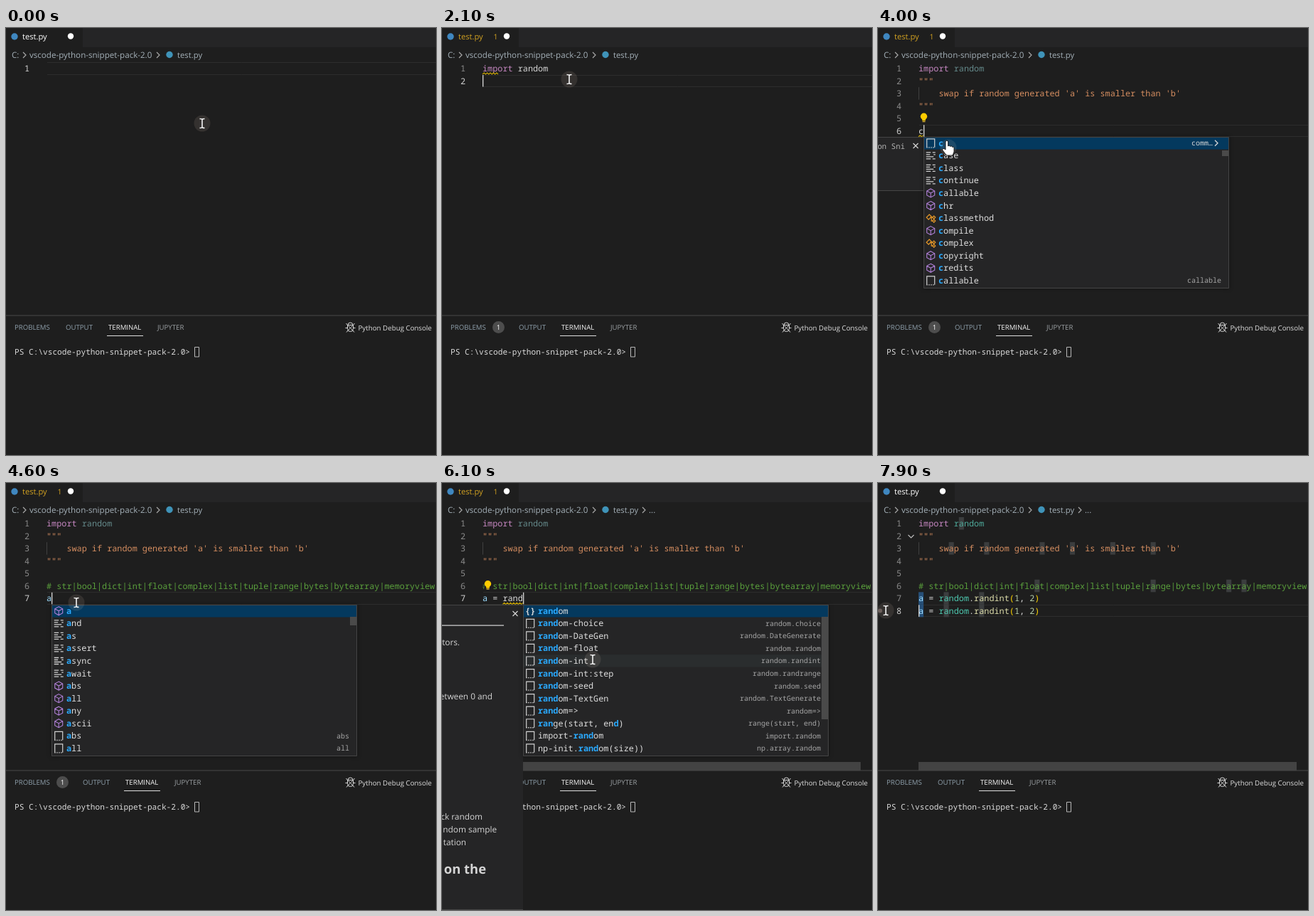
Animation of 605 by 600 pixels, one loop 8000 ms. Source, as an HTML page with a canvas:

```html
<!DOCTYPE html>
<html lang="en">
<head>
<meta charset="utf-8">
<title>Editor snippets</title>
<style>
  html, body { margin: 0; width: 100%; height: 100%; overflow: hidden; background: #1e1e1e; }
  canvas { display: block; }
</style>
</head>
<body>
<canvas id="stage" width="605" height="600"></canvas>
<script>
const ctx = document.getElementById('stage').getContext('2d');
const LOOP = 8000, LEFT = 57, TOP = 48, ROW = 17.55, CELL = 7.1, ROWS = 12, POPUP_W = 430;
const MONO = '"Noto Sans Mono", monospace', UI = '"Open Sans", sans-serif';
const CODE = '11.83px ' + MONO, SMALL = '500 10px ' + MONO;
const AMBER = '#d0a021', RED = '#f48771', MATCH = '#2aaaff';

const DOC = ['import random', '"""', "    swap if random generated 'a' is smaller than 'b'", '"""', ''];
const TYPES = '# str|bool|dict|int|float|complex|list|tuple|range|bytes|bytearray|memoryview';
const RAND = 'a = random.randint';
const withTypes = (...rest) => [...DOC, TYPES, ...rest];

// Each entry is "icon label / detail"; icons: k keyword, s snippet, f function, c class, m module.
const parse = text => text.trim().split('\n').map(row => {
  const [name, detail = ''] = row.trim().split(' / ');
  return { icon: name[0], label: name.slice(2), detail };
});
const I_LIST = parse(`k if
  k import
  k in
  k is
  f id
  f input
  c int
  f isinstance
  f issubclass
  f iter
  s if / if
  s import / import`);
const IMPORT_LIST = parse(`k import
  s import / import
  s import-as - shortcut / import module as newname
  s import-codecs / import.codecs
  s import-collections / import.collections
  s import-glob / import.glob
  s import-math / import.math
  s import-matplotlib / import.matplotlib
  s import-matplotlib.pyplot / import.matplotlib.pyplot
  s import-numpy / import.numpy
  s import-os / import.os
  s import-pandas / import.pandas`);
const C_LIST = parse(`s c / comm…
  k case
  k class
  k continue
  f callable
  f chr
  c classmethod
  f compile
  c complex
  f copyright
  f credits
  s callable / callable`);
const CC_LIST = [{ icon: 's', label: 'cc', detail: 'comm…' }, ...C_LIST.slice(1)];
const A_LIST = parse(`f a
  k and
  k as
  k assert
  k async
  k await
  f abs
  f all
  f any
  f ascii
  s abs / abs
  s all / all`);
const RANDOM_LIST = parse(`m random
  s random-choice / random.choice
  s random-DateGen / random.DateGenerate
  s random-float / random.random
  s random-int / random.randint
  s random-int:step / random.randrange
  s random-seed / random.seed
  s random-TextGen / random.TextGenerate
  s random=> / random=>
  s range(start, end) / range(start, end)
  s import-random / import.random
  s np-init.random(size)) / np.array.random`);

const popup = (items, match, thumb, docs) => ({ items, match, thumb, docs });
const importPopup = match => popup(IMPORT_LIST, match, [84, 128]);
const randomPopup = match => popup(RANDOM_LIST, match, [188, 332], 'random');

// [time, changes]; every step keeps whatever it does not mention.
const steps = [
  [0, { lines: [''], line: 0, caret: null, mouse: [276, 134], hand: false, popup: null, status: null,
        squiggle: null, bulb: null, select: null, module: '#d4d4d4', scroll: false, more: false, marks: false, fold: false }],
  [100, { lines: ['i'], caret: 1 }],
  [200, { popup: popup(I_LIST, 'i', [84, 96]) }],
  [500, { lines: ['im'], caret: 2 }],
  [600, { popup: importPopup('im') }],
  [1100, { lines: ['imp'], caret: 3, popup: importPopup('imp') }],
  [1200, { mouse: [179, 83] }],
  [1300, { status: AMBER, squiggle: [0, 0, 3] }],
  [1700, { caretOff: true }],
  [1900, { mouse: [179, 72] }],
  [2100, { lines: ['import random', ''], line: 1, caret: 0, caretOff: false, popup: null }],
  [2200, { status: null, squiggle: null, module: '#64898a' }],
  [2300, { lines: ['import random', 'c'], caret: 1 }],
  [2400, { popup: popup(C_LIST, 'c', [102, 110], 'snippet') }],
  [2700, { caretOff: true }],
  [2900, { status: AMBER, squiggle: [1, 0, 1] }],
  [3200, { lines: ['import random', 'cc'], caret: 2, caretOff: false, popup: popup(CC_LIST, 'c', [102, 110], 'snippet') }],
  [3700, { lines: ['import random', '"""', '    ', '"""'], line: 2, caret: 4, popup: null, squiggle: null }],
  [3800, { lines: DOC.slice(0, 4), caret: 52 }],
  [3900, { lines: [...DOC, ''], line: 5, caret: 0 }],
  [4000, { lines: [...DOC, 'c'], caret: 1, popup: popup(C_LIST, 'c', [172, 180], 'snippet'),
           squiggle: [5, 0, 1], bulb: 4, mouse: [99, 168], hand: true }],
  [4200, { lines: [...DOC, '# '], caret: 2, popup: null, squiggle: null, bulb: null }],
  [4300, { lines: withTypes(), caret: null, hand: false }],
  [4400, { lines: withTypes(''), line: 6, caret: 0 }],
  [4500, { lines: withTypes('a'), caret: 1 }],
  [4600, { popup: popup(A_LIST, 'a', [188, 200]) }],
  [4700, { mouse: [125, 195] }],
  [4900, { lines: withTypes('a '), caret: 2, popup: null, scroll: true }],
  [5000, { lines: withTypes('a ='), caret: 3, status: RED, squiggle: [6, 3, 4, '#f14c4c'], more: true }],
  [5300, { lines: withTypes('a = '), caret: null, squiggle: [6, 3.5, 4.5, '#f14c4c'] }],
  [5400, { lines: withTypes('a = r'), caret: 5, squiggle: null, popup: randomPopup('r') }],
  [5500, { lines: withTypes('a = ra'), caret: 6, popup: randomPopup('ra'), mouse: [212, 260] }],
  [5600, { lines: withTypes('a = rand'), caret: 8, caretOff: true, popup: randomPopup('rand'),
           status: AMBER, squiggle: [6, 4, 8], bulb: 5 }],
  [5900, { caretOff: false }],
  [6100, { mouse: [212, 248] }],
  [6300, { lines: withTypes(RAND + '(start, end(include))'), caret: null, popup: null, select: [6, 19, 24] }],
  [6500, { bulb: null, squiggle: null }],
  [6800, { lines: withTypes(RAND + '(1, end(include))'), select: null, caret: 20, status: RED }],
  [7000, { caret: null, select: [6, 22, 34] }],
  [7400, { lines: withTypes(RAND + '(1, 2)'), select: null, caret: 23, status: null, module: '#4ea99a' }],
  [7700, { lines: withTypes(RAND + '(1, 2)', RAND + '(1, 2)'), line: 7 }],
  [7800, { mouse: [11, 179], fold: true, caret: 0 }],
  [7900, { marks: true }]
];
let current = {};
const states = steps.map(([at, change]) => ({ at, ...(current = { ...current, ...change }) }));

const xOf = col => LEFT + col * CELL;
const yOf = line => TOP + line * ROW;

function rect(x, y, w, h, fill) {
  ctx.fillStyle = fill;
  ctx.fillRect(x, y, w, h);
}
function disc(x, y, r, fill) {
  ctx.fillStyle = fill;
  ctx.beginPath();
  ctx.arc(x, y, r, 0, 7);
  ctx.fill();
}
function stroke(path, color, width = 1) {
  ctx.strokeStyle = color;
  ctx.lineWidth = width;
  ctx.stroke(new Path2D(path));
}
function text(str, x, y, font, color, align = 'left') {
  ctx.font = font;
  ctx.fillStyle = color;
  ctx.textAlign = align;
  ctx.fillText(str, x, y);
}
const code = (str, x, y, color, align) => text(str, x, y, '500 ' + CODE, color, align);
function at(x, y, draw) {
  ctx.save();
  ctx.translate(x, y);
  draw();
  ctx.restore();
}
const chevron = (x, y) => stroke(`M${x - 2} ${y - 4}l4 4l-4 4`, '#a8a8a8', 1.2);
const cross = (x, y) => stroke(`M${x - 3.5} ${y - 3.5}l7 7m0 -7l-7 7`, '#d5d5d5', 1.2);

function drawHeader(s) {
  rect(108, 0, 497, 27, '#252526');
  disc(12, 12, 4.7, '#3f87c0');
  text('test.py', 23, 16.3, '11.2px ' + UI, s.status || '#ffffff');
  if (s.status) text('1', 72.5, 16, '10.5px ' + UI, s.status);
  disc(91, 11.5, 4.2, '#ffffff');

  const font = '11.6px ' + UI, gray = '#a4b0b8';
  text('C:', 8, 42, font, gray);
  chevron(26, 38);
  text('vscode-python-snippet-pack-2.0', 33, 42, font, gray);
  chevron(214, 38);
  disc(230, 37.5, 4.7, '#3f93b8');
  text('test.py', 241, 42, '11.3px ' + UI, gray);
  if (s.more) {
    chevron(284, 38);
    text('...', 291, 42, font, gray);
  }
}

function drawPanel(s) {
  rect(0, 403.5, 605, 1, '#484848');
  const shift = s.status ? 24 : 0, font = '9.65px ' + UI, gray = '#8fa0ac';
  text('PROBLEMS', 12, 424, font, gray);
  if (shift) {
    disc(79.5, 420.5, 8.5, '#4d4d4d');
    text('1', 79.5, 424, font, '#ffffff', 'center');
  }
  text('OUTPUT', 84 + shift, 424, font, gray);
  text('TERMINAL', 144 + shift, 424, font, '#f4f4f4');
  text('JUPYTER', 213 + shift, 424, font, '#9a9fa2');
  rect(142 + shift, 432, 51, 1, '#e0e0e0');

  at(484.5, 420.5, () => {
    stroke('M-3.5 -3a3.5 3.5 0 0 1 7 0M-4 -3h8v5a4 4 0 0 1 -8 0zM-3 -2l6 6m0 -6l-6 6', '#dcdcdc');
    stroke('M-4 -3l-2 -2.5M4 -3l2 -2.5M-4 1h-3M4 1h3M-3 4l-2.5 3M3 4l2.5 3', '#dcdcdc');
  });
  text('Python Debug Console', 495.5, 425, '9.75px ' + UI, '#dedede');
  text('PS C:\\vscode-python-snippet-pack-2.0>', 12, 459.3, '500 11.13px ' + MONO, '#dadada');
  stroke('M265.5 448.5h6v13.5h-6z', '#b8b8b8');
}

function tokens(line, s) {
  if (line[0] === '#') return [[line, '#5a9f3c']];
  if (/^("""| {4})/.test(line)) return [[line, '#d48d60']];
  const isImport = line.startsWith('import');
  const color = word =>
    word === 'import' ? '#c586c0' :
    word === 'random' ? (isImport ? s.module : '#4ec9b0') :
    word === 'randint' ? '#dcdcaa' :
    word === 'a' ? '#9cdcfe' :
    /[()]/.test(word) ? '#ffd700' :
    /\d/.test(word) ? '#b5cea8' : '#dcdcdc';
  return (line.match(/\w+|[()]|[^\w()]+/g) || []).map(word => [word, color(word)]);
}

function drawMarks(s) {
  s.lines.forEach((line, row) => {
    [...line].forEach((char, col) => {
      if (char === 'a') rect(xOf(col), yOf(row), CELL, ROW, row > 5 && !col ? '#264f78' : '#3b3d3e');
    });
  });
}

function drawSquiggle([row, from, to, color = '#cca700']) {
  const end = xOf(to), y = yOf(row) + 16;
  let path = `M${xOf(from)} ${y + 1}`;
  for (let x = xOf(from) + 2.2, up = true; x <= end + 1; x += 2.2, up = !up) path += `L${x} ${y + (up ? -1 : 1)}`;
  stroke(path, color, 1.1);
}

function drawCode(s) {
  const y = yOf(s.line);
  stroke(`M58 ${Math.round(y) + .5}H605M58 ${Math.round(y + ROW) - .5}H605`, '#2d2d2d');
  if (s.marks) drawMarks(s);
  if (s.select) {
    const [row, from, to] = s.select;
    rect(xOf(from), yOf(row), (to - from) * CELL, ROW, '#264f78');
  }
  if (s.lines.length > 3) rect(57, yOf(2), 1, ROW, '#404040');
  s.lines.forEach((line, row) => {
    const base = yOf(row) + 13;
    code(row + 1, 33, base, row === s.line ? '#d0d0d0' : '#8a8a8a', 'right');
    let col = 0;
    for (const [word, color] of tokens(line, s)) {
      code(word, xOf(col), base, color);
      col += word.length;
    }
  });
  if (s.squiggle) drawSquiggle(s.squiggle);
  if (s.fold) stroke('M42.5 73l4 4l4 -4', '#c0c0c0', 1.1);
  if (s.bulb !== null) drawBulb(64.5, yOf(s.bulb) + 7);
  if (s.caret !== null && !s.caretOff) rect(Math.round(xOf(s.caret)), y + .5, 1.3, ROW - 1, '#d8d8d8');
  if (s.scroll) rect(57, 392, 532, 12, '#434343');
}

function drawBulb(x, y) {
  rect(x - 5, y - 6, 10, 14, '#1e1e1e');
  disc(x, y - 1, 4.7, '#ffcc00');
  rect(x - 2.3, y + 2, 4.6, 3, '#ffcc00');
  rect(x - 2, y + 5.5, 4, 1.5, '#d8b030');
}

const icons = {
  s() {
    stroke('M-5.5 6V-6H5.5V6', '#d0d0d0', 1.2);
    ctx.setLineDash([1.5, 1.5]);
    stroke('M-6 6H6', '#d0d0d0', 1.3);
    ctx.setLineDash([]);
  },
  k() {
    stroke('M-6.5 -4.5H0M2.5 -4.5H6.5M-6.5 -1.5H-1M4 -1.5H6.5M-6.5 1.5H4M-6.5 4.5H0M2.5 4.5H6.5', '#d0d0d0', 1.3);
  },
  f() { stroke('M0 -6L5.5 -3V3L0 6L-5.5 3V-3ZM-5.5 -3L0 0L5.5 -3M0 0V6', '#b180d7', 1.1); },
  c() { stroke('M-6 -1L-2 -5L1 -2L-3 2ZM-1 -1H3M1 -1V4H3M4.5 -3L6.5 -1L4.5 1L2.5 -1ZM4.5 2L6.5 4L4.5 6L2.5 4Z', '#ee9d28', 1.2); },
  m() { text('{}', 0, 4, 'bold ' + CODE, '#d8d8d8', 'center'); }
};

// Indexes of label letters that match the typed prefix, in order.
function matched(label, typed) {
  const whole = label.indexOf(typed);
  if (whole >= 0) return [...typed].map((_, i) => whole + i);
  let from = 0;
  return [...typed].map(char => (from = label.indexOf(char, from) + 1) - 1);
}

function drawLabel(label, typed, x, y) {
  const hits = matched(label, typed);
  for (let i = 0; i < label.length;) {
    const hit = hits.includes(i);
    let end = i + 1;
    while (end < label.length && hits.includes(end) === hit) end++;
    text(label.slice(i, end), x + i * CELL, y, (hit ? 'bold ' : '500 ') + CODE, hit ? MATCH : '#dedede');
    i = end;
  }
}

function drawDocs(kind, edge, top) {
  const bottom = kind === 'random' ? 600 : top + 76;
  rect(0, top, edge, bottom - top, '#252526');
  stroke(`M0 ${top + .5}H${edge}M0 ${bottom - .5}H${edge}`, '#454545');
  cross(edge - 11, top + 12.5);
  if (kind === 'snippet') {
    text('on Sni', edge - 26, top + 17, '10.8px ' + MONO, '#b0b0b0', 'right');
    return;
  }
  const font = '11.8px ' + UI, gray = '#d4d4d4';
  rect(0, 199.5, edge - 27, 1.2, '#d8d8d8');
  const rows = [['tors.', 25, 228], ['etween 0 and', 71, 304], ['ck random', 57, 473], ['ndom sample', 77, 491], ['tation', 34, 509]];
  for (const [str, right, y] of rows) text(str, right + edge - 114, y, font, gray, 'right');
  text('on the', 62 + edge - 114, 548.5, 'bold 18.4px ' + UI, gray, 'right');
}

function drawPopup(s) {
  const { items, match, thumb, docs } = s.popup;
  const x = Math.round(xOf(s.caret)), top = Math.round(yOf(s.line + 1));
  const height = Math.round(ROWS * ROW + 2);
  if (docs) drawDocs(docs, x, top);
  ctx.shadowColor = 'rgba(0,0,0,.4)';
  ctx.shadowBlur = 6;
  rect(x, top, POPUP_W, height, '#252526');
  ctx.shadowColor = 'transparent';

  const [mx, my] = s.mouse;
  const hover = Math.floor((my - top) / ROW);
  items.forEach((item, i) => {
    const y = top + i * ROW, mid = y + ROW / 2;
    if (!i) rect(x, y, POPUP_W, ROW, '#04395e');
    else if (i === hover && mx > x) rect(x, y, POPUP_W, ROW, '#2a2d2e');
    at(x + 10.2, mid, icons[item.icon]);
    drawLabel(item.label, match, x + 21, mid + 4);
    const more = item.detail.endsWith('…');
    text(item.detail, x + (more ? 407 : 419), mid + 3.5, SMALL, i ? '#a6a6a6' : '#d8d8d8', 'right');
    if (more) stroke(`M${x + 410} ${mid - 4}l4 4l-4 4`, '#d8d8d8', 1.3);
  });
  rect(x + POPUP_W - 10, thumb[0], 10, thumb[1] - thumb[0], '#4a4a4a');
  stroke(`M${x + .5} ${top + .5}h${POPUP_W - 1}v${height - 1}h${1 - POPUP_W}z`, '#454545');
}

function drawMouse(s) {
  const [x, y] = s.mouse;
  disc(x, y, 11.5, 'rgba(255,225,205,.1)');
  at(x, y, () => {
    if (!s.hand) {
      stroke('M-3.5 -6.5Q0 -6.5 0 -5Q0 -6.5 3.5 -6.5M0 -5.5V5.5M-3.5 6.5Q0 6.5 0 5Q0 6.5 3.5 6.5', '#f5f5f5', 1.6);
      return;
    }
    const hand = 'M-4 3V-8a1.8 1.8 0 0 1 3.6 0V-2a1.7 1.7 0 0 1 3 .6a1.7 1.7 0 0 1 3 .8a1.5 1.5 0 0 1 2.4 1.4V6L6 11H-2.5L-8 4a1.6 1.6 0 0 1 2 -2.4Z';
    ctx.fillStyle = '#ffffff';
    ctx.fill(new Path2D(hand));
    stroke(hand, '#111111', .9);
  });
}

function draw(s) {
  rect(0, 0, 605, 600, '#1e1e1e');
  drawHeader(s);
  drawCode(s);
  drawPanel(s);
  if (s.popup) drawPopup(s);
  if (s.fold) disc(3, 179.5, 3, '#5c5250');
  drawMouse(s);
}

ctx.textRendering = 'geometricPrecision';
const start = performance.now();
function tick() {
  const time = (performance.now() - start) % LOOP;
  draw(states.findLast(s => s.at <= time));
  requestAnimationFrame(tick);
}
tick();
</script>
</body>
</html>
```
